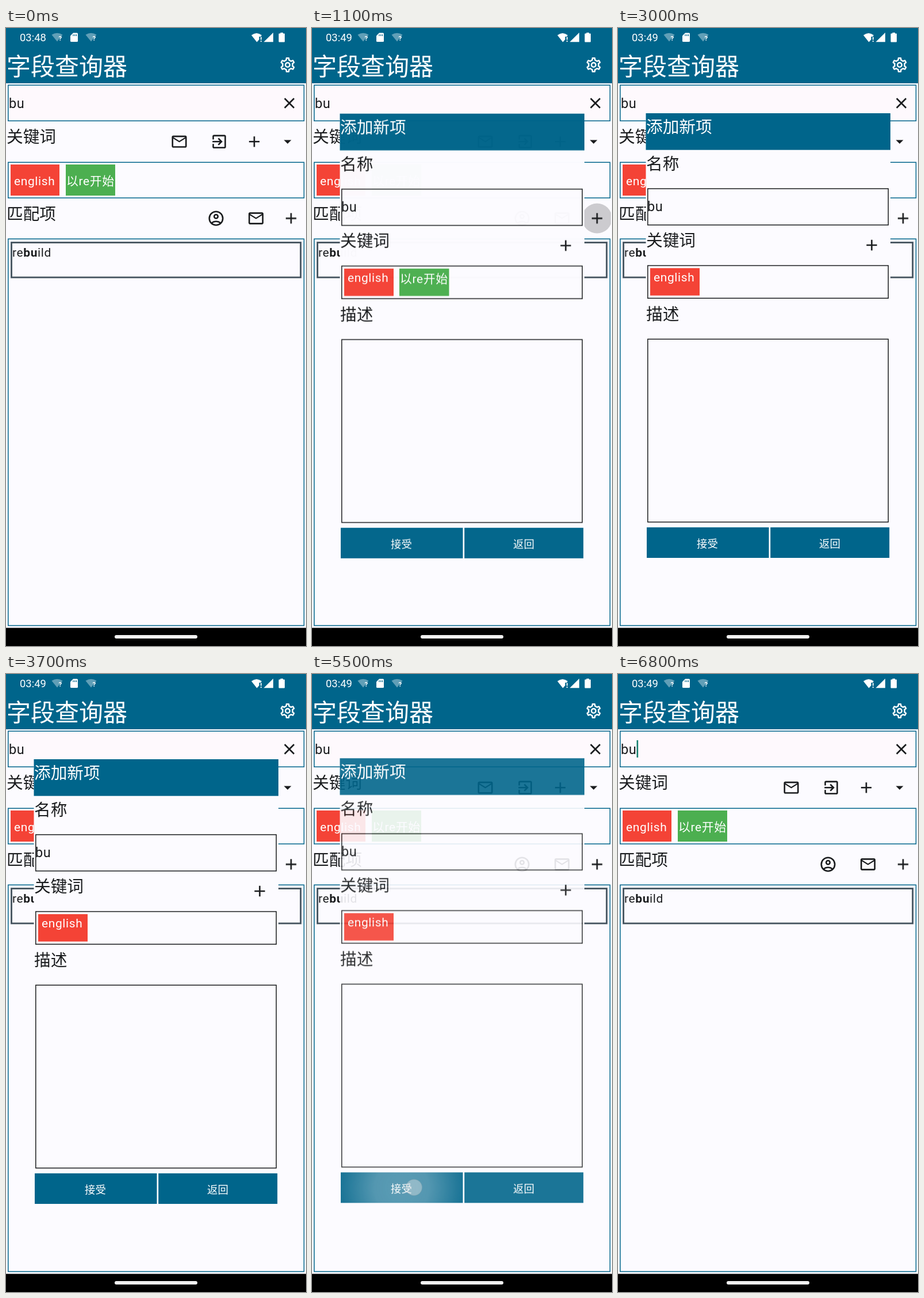
Recreate the animation shown at these times as an HTML page. Size 522 by 1073 pixels, loop 6.9 s.

```html
<!DOCTYPE html>
<html lang="zh-CN">
<head>
<meta charset="utf-8">
<title>字段查询器</title>
<style>
html, body { margin: 0; width: 100%; height: 100%; overflow: hidden; background: #000; }
svg { display: block; width: 522px; height: 1073px; }
text { font-family: Roboto, "Noto Sans CJK SC", "Noto Sans CJK", sans-serif; fill: #1a1c1e; white-space: pre; }
.app { font-size: 42px; }
.title { font-size: 28.7px; }
.body { font-size: 20.9px; letter-spacing: .65px; }
.input { font-size: 23.5px; letter-spacing: .65px; }
.small { font-size: 18.4px; }
.white { fill: #fff; }
.teal { fill: #00658b; }
.paper { fill: #fcfbff; }
.red { fill: #f44336; }
.green { fill: #4caf50; }
.frame { fill: none; stroke: #00658b; stroke-width: 1.5; }
.dark { stroke: #1a1c1e; }
.icon { fill: #1a1c1e; }
.line { fill: none; stroke: #1a1c1e; stroke-width: 2; }
.gear { fill: none; stroke: #fff; stroke-width: 1.9; stroke-linejoin: round; }
.touch { fill: rgba(232,232,232,.62); stroke: rgba(150,150,150,.35); stroke-width: 1; }

.anim { animation: 6900ms linear infinite both; }
.cut { animation-timing-function: step-end; }
#oldTime { animation-name: oldTime; }
#newTime { animation-name: newTime; }
#caret { animation-name: caret; }
#dialog { animation-name: dialog; }
#glow { animation-name: glow; }
#disc { animation-name: disc; }
#tag { animation-name: tag; }
#shade { animation-name: shade; }
#wave { animation-name: wave; }
#tapAdd { animation-name: tapAdd; }
#tapTag { animation-name: tapTag; }
#tapOk { animation-name: tapOk; }

/* 1% = 69 ms */
@keyframes oldTime { 0% { opacity: 1 } 5%, 100% { opacity: 0 } }
@keyframes newTime { 0% { opacity: 0 } 5%, 100% { opacity: 1 } }
@keyframes caret {
  0% { opacity: 0 } 7.2% { opacity: 1 } 14.4% { opacity: 0 }
  82.5% { opacity: 1 } 89.8% { opacity: 0 } 97% { opacity: 1 } 100% { opacity: 1 }
}
@keyframes dialog {
  0%, 13.4% { opacity: 0; transform: translateY(28px) }
  14.5% { opacity: .7; transform: translateY(8px) }
  15.942% { opacity: .985; transform: translateY(.7px) }
  17.4%, 78.3% { opacity: 1; transform: none }
  79.71% { opacity: .9; transform: translateY(-1.6px) }
  81.16% { opacity: .4; transform: translateY(-11px) }
  82.5%, 100% { opacity: 0; transform: translateY(-28px) }
}
@keyframes glow {
  0%, 11.3% { opacity: 0 } 13%, 13.4% { opacity: 1 } 15.6%, 100% { opacity: 0 }
}
@keyframes disc {
  0%, 13.1% { opacity: 0 } 15%, 16.5% { opacity: 1 } 20%, 100% { opacity: 0 }
}
@keyframes tag { 0% { opacity: 1 } 40.5%, 100% { opacity: 0 } }
@keyframes shade {
  0%, 31.4% { opacity: 0 } 32.8%, 39% { opacity: 1 } 40.5%, 100% { opacity: 0 }
}
@keyframes wave {
  0%, 76.5% { opacity: 0; transform: translate(22px, 0) scale(.2) }
  77% { opacity: .7; transform: translate(18px, 0) scale(.4) }
  79.7%, 81% { opacity: 1; transform: none }
  83%, 100% { opacity: 0; transform: none }
}
@keyframes tapAdd {
  0%, 10.8% { opacity: 0 } 11.3%, 12% { opacity: 1 } 13.043% { opacity: .35 } 14%, 100% { opacity: 0 }
}
@keyframes tapTag {
  0%, 31.4% { opacity: 0 } 32%, 38.5% { opacity: 1 } 40.5%, 100% { opacity: 0 }
}
@keyframes tapOk {
  0%, 76.3% { opacity: 0 } 76.9%, 78.6% { opacity: 1 } 79.71% { opacity: .65 } 81.3%, 100% { opacity: 0 }
}
</style>
</head>
<body>
<svg viewBox="0 0 522 1073" xmlns="http://www.w3.org/2000/svg">
  <defs>
    <!-- icons on a 24 unit grid, centred on the origin -->
    <g id="mail" transform="scale(1.305) translate(-12 -12)">
      <path class="icon" d="M22 6c0-1.1-.9-2-2-2H4c-1.1 0-2 .9-2 2v12c0 1.1.9 2 2 2h16c1.1 0 2-.9 2-2V6zm-2 0l-8 5-8-5h16zm0 12H4V8l8 5 8-5v10z"/>
    </g>
    <path id="plus" class="icon" transform="scale(1.305)" d="M7 1H1V7H-1V1H-7V-1H-1V-7H1V-1H7z"/>
    <path id="tooth" class="gear" d="M-3.3-5.72L-1.9-6.4-1.5-9H1.5L1.9-6.4 3.3-5.72"/>
    <g id="weakWifi">
      <path d="M-9.5 2.8Q0-3.2 9.5 2.8L0 14.5z" fill="#fff" opacity=".38"/>
      <text class="white" x="2.5" y="13" font-size="11.5" font-weight="700">?</text>
    </g>
    <radialGradient id="soft">
      <stop offset="0" stop-color="#000" stop-opacity=".3"/>
      <stop offset=".5" stop-color="#000" stop-opacity=".23"/>
      <stop offset="1" stop-color="#000" stop-opacity="0"/>
    </radialGradient>
    <radialGradient id="light">
      <stop offset="0" stop-color="#fff" stop-opacity=".29"/>
      <stop offset=".45" stop-color="#fff" stop-opacity=".25"/>
      <stop offset="1" stop-color="#fff" stop-opacity="0"/>
    </radialGradient>
    <clipPath id="addClip"><rect x="473" y="300" width="46.5" height="62"/></clipPath>
    <clipPath id="okClip"><rect x="50" y="867" width="212.5" height="53"/></clipPath>
  </defs>

  <rect class="paper" width="522" height="1042"/>
  <rect class="teal" width="522" height="96"/>

  <!-- status bar -->
  <text id="oldTime" class="small white anim cut" x="24" y="23">03:48</text>
  <text id="newTime" class="small white anim cut" x="24" y="23">03:49</text>
  <use href="#weakWifi" x="89" y="9"/>
  <path class="white" d="M117 8.5h6.5q1.5 0 1.5 1.5v12.500q0 1.500-1.500 1.500h-10q-1.500 0-1.500-1.500V13.500z"/>
  <path d="M117 11v3M119.800 11v3M122.500 11v3" stroke="#00658b" stroke-width="1.200"/>
  <use href="#weakWifi" x="148" y="9"/>
  <path class="white" d="M427 12.500Q436 5.500 445 12.500L443 15H440.500V20L436.500 24.500z"/>
  <path d="M443.800 15.500v5M443.800 22v2" stroke="#fff" stroke-width="1.800"/>
  <path class="white" d="M465 8V24.300H448.500z"/>
  <path class="white" d="M477.500 8h4.500v1.500h2q1 0 1 1v13q0 1-1 1h-8.500q-1 0-1-1v-13q0-1 1-1h2z"/>

  <!-- app bar -->
  <text class="app white" x="1" y="82">字段查询器</text>
  <g transform="translate(490 64) scale(1.305)">
    <use href="#tooth"/>
    <use href="#tooth" transform="rotate(60)"/>
    <use href="#tooth" transform="rotate(120)"/>
    <use href="#tooth" transform="rotate(180)"/>
    <use href="#tooth" transform="rotate(240)"/>
    <use href="#tooth" transform="rotate(300)"/>
    <circle class="gear" r="2.900"/>
  </g>

  <!-- search -->
  <rect class="frame" x="3.750" y="99.250" width="514.750" height="62" style="fill:#fef9fd"/>
  <text class="input" x="5" y="138.500">bu</text>
  <rect id="caret" class="anim cut" x="32.500" y="115" width="2.600" height="30" fill="#16806f"/>
  <path class="line" transform="translate(493 130.500) scale(1.305)" d="M-6.300-6.300L6.300 6.300M6.300-6.300L-6.300 6.300"/>

  <!-- keywords -->
  <text class="title" x="1" y="199">关键词</text>
  <use href="#mail" x="301.500" y="197.300"/>
  <path class="icon" transform="translate(371 197.300) scale(1.305) translate(-12 -12)" d="M10.090 15.590L11.500 17l5-5-5-5-1.410 1.410L12.670 11H3v2h9.670l-2.580 2.590zM19 3H5c-1.110 0-2 .9-2 2v4h2V5h14v14H5v-4H3v4c0 1.100.89 2 2 2h14c1.100 0 2-.9 2-2V5c0-1.100-.9-2-2-2z"/>
  <use href="#plus" x="432" y="197.300"/>
  <path class="icon" d="M483.500 194.500h13l-6.500 6.500z"/>
  <rect class="frame" x="3.750" y="233.250" width="514.750" height="61.750"/>
  <rect class="red" x="8" y="237" width="85" height="54"/>
  <text class="body white" x="14" y="272.500">english</text>
  <rect class="green" x="104" y="237" width="86" height="54"/>
  <text class="body white" x="105" y="273">以re开始</text>

  <!-- matches -->
  <text class="title" x="1" y="332.500">匹配项</text>
  <g class="line" transform="translate(365.500 330.500) scale(1.305)">
    <circle r="9"/>
    <circle cy="-2.500" r="2.500"/>
    <path d="M-6.200 6.300Q-3.400 4 0 4T6.200 6.300"/>
  </g>
  <use href="#mail" x="435" y="330.500"/>
  <g clip-path="url(#addClip)">
    <circle id="glow" class="anim" cx="496" cy="330.500" r="27" fill="url(#soft)"/>
    <circle id="disc" class="anim" cx="496" cy="330.500" r="26" fill="#000" fill-opacity=".19"/>
  </g>
  <use href="#plus" x="496" y="330.500"/>
  <rect class="frame" x="3.750" y="366.250" width="514.750" height="671.250"/>
  <rect x="9.500" y="372.500" width="503.250" height="60.500" fill="none" stroke="#44535e" stroke-width="2.800"/>
  <text class="body" x="11" y="396.500">re<tspan font-weight="700">bu</tspan>ild</text>

  <!-- navigation bar -->
  <rect y="1041.500" width="522" height="32"/>
  <rect x="189" y="1054" width="144" height="6" rx="3" fill="#f2f2f2"/>

  <!-- add dialog -->
  <g id="dialog" class="anim">
    <rect class="paper" x="48.500" y="148" width="425.500" height="773"/>
    <rect class="teal" x="48.500" y="148" width="425.500" height="63.700"/>
    <text class="title white" x="49" y="182">添加新项</text>
    <text class="title" x="49" y="245.500">名称</text>
    <rect class="frame dark" x="51.750" y="279" width="418.500" height="63"/>
    <text class="input" x="51" y="317.500">bu</text>
    <text class="title" x="49" y="379">关键词</text>
    <use href="#plus" x="441.500" y="377"/>
    <rect class="frame dark" x="51.750" y="412.500" width="418.500" height="56.700"/>
    <rect class="red" x="56" y="417" width="86" height="47.500"/>
    <text class="body white" x="62" y="440">english</text>
    <g id="tag" class="anim cut">
      <rect class="green" x="152" y="417" width="86.500" height="47.500"/>
      <text class="body white" x="153" y="441.500">以re开始</text>
      <rect id="shade" class="anim" x="152" y="417" width="86.500" height="47.500" fill="#000" fill-opacity=".17"/>
    </g>
    <text class="title" x="49" y="506.500">描述</text>
    <rect class="frame dark" x="51.750" y="540.250" width="418.500" height="317.500"/>
    <rect class="teal" x="50" y="867" width="212.500" height="53"/>
    <rect class="teal" x="265.200" y="867" width="207" height="53"/>
    <g clip-path="url(#okClip)">
      <g transform="translate(156 893.500)">
        <circle id="wave" class="anim" r="106" fill="url(#light)"/>
      </g>
    </g>
    <text class="small white" x="137" y="902">接受</text>
    <text class="small white" x="350" y="902">返回</text>
  </g>

  <!-- finger marks -->
  <circle id="tapAdd" class="touch anim" cx="509" cy="338" r="13.500"/>
  <circle id="tapTag" class="touch anim" cx="200" cy="432" r="14"/>
  <circle id="tapOk" class="touch anim" cx="177.500" cy="891.500" r="14"/>
</svg>
</body>
</html>
```
